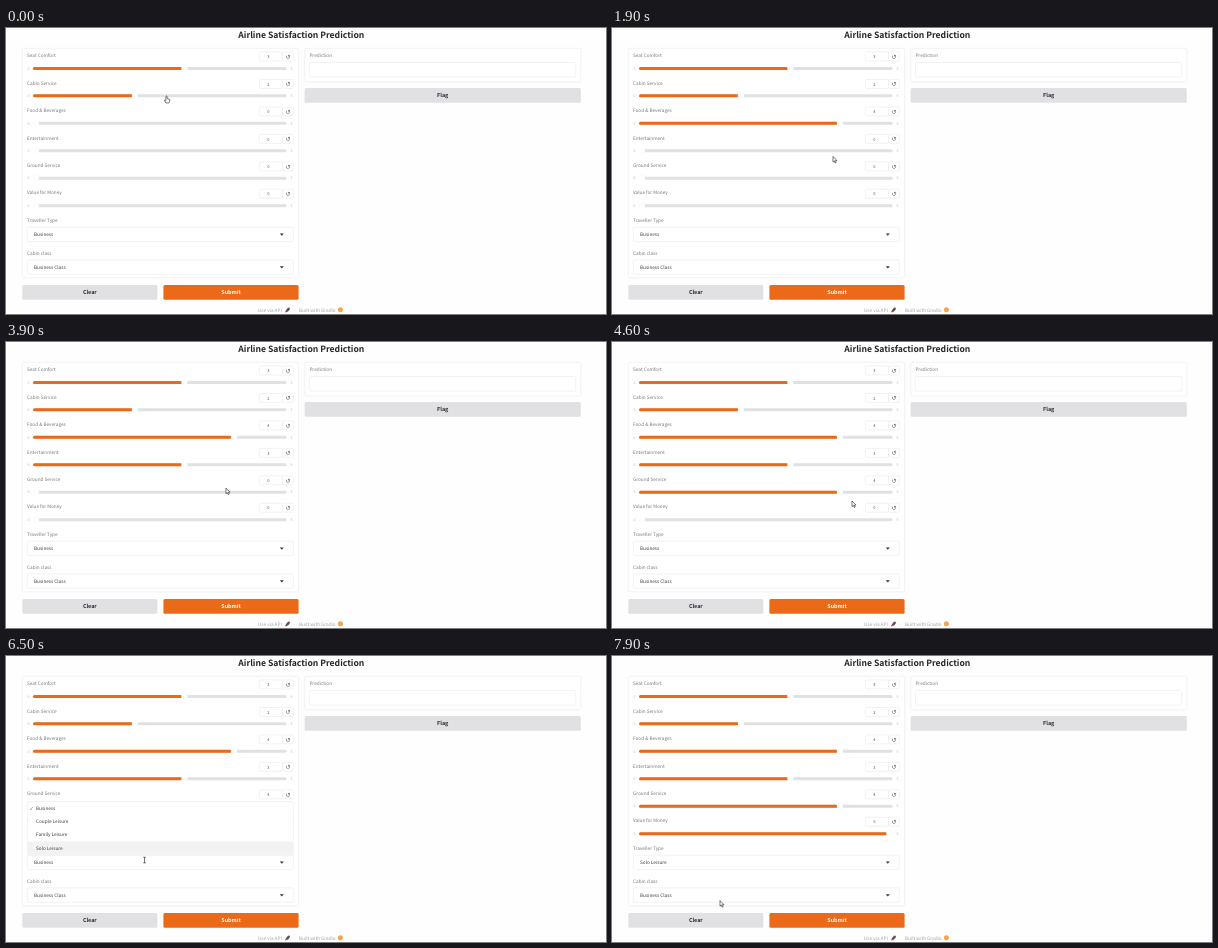
Write an HTML page that moves like this. It is 600 px wide and 286 px high and loops after 8 s.

```html
<!DOCTYPE html>
<html lang="en">
<head>
<meta charset="utf-8">
<title>Airline Satisfaction Prediction</title>
<style>
  html, body { margin: 0; width: 100%; height: 100%; overflow: hidden; background: #fefefe; }
  svg { display: block; width: 600px; height: 286px; }
  text {
    font: 4.7px "Noto Sans CJK JP", "Noto Sans CJK SC", "Noto Sans", sans-serif;
    fill: #77777c; text-rendering: geometricPrecision;
  }
  text.title { font-size: 8.6px; font-weight: 600; fill: #26262b; }
  text.button { font-size: 5.4px; font-weight: 600; fill: #2b2b30; }
  text.value { fill: #3c3c42; }
  text.number { font-size: 4px; fill: #55555a; }
  text.limit { font-size: 3.6px; fill: #b0b0b4; }
  text.foot { fill: #a2a2a8; }
  text.icon { font: 6px "DejaVu Sans", sans-serif; fill: #55555a; }
  .middle { text-anchor: middle; }
  .box { fill: #fff; stroke: #e9e9eb; stroke-width: .6; }
</style>
</head>
<body>
<svg id="stage" viewBox="0 0 600 286"></svg>
<script>
const LOOP = 8000;
const ORANGE = '#ea6a1a';
const stage = document.getElementById('stage');

function add(name, attrs, parent = stage) {
  const node = document.createElementNS('http://www.w3.org/2000/svg', name);
  for (const key in attrs) node.setAttribute(key, attrs[key]);
  return parent.appendChild(node);
}

function write(x, y, content, cls = '', parent = stage) {
  const node = add('text', { x, y, class: cls }, parent);
  node.textContent = content;
  return node;
}

function rect(x, y, width, height, attrs, parent = stage) {
  return add('rect', { x, y, width, height, rx: 1.5, ...attrs }, parent);
}

const box = (x, y, w, h) => rect(x, y, w, h, { class: 'box' });

function button(x, y, w, h, label, fill, ink) {
  rect(x, y, w, h, { fill });
  const node = write(x + w / 2, y + h / 2 + 2, label, 'button middle');
  if (ink) node.style.fill = ink;
}

function dropdown(y, label, value) {
  write(21, y - 5.2, label);
  box(21.3, y, 266, 14.4);
  add('path', { d: `M273.8 ${y + 6.4}h4l-2 2.2z`, fill: '#333' });
  return write(28, y + 9.2, value, 'value');
}

// Static layout
write(295.3, 10.3, 'Airline Satisfaction Prediction', 'title middle');
box(16.3, 20.3, 276.4, 229.6);
box(298.8, 20.3, 276, 33.6);
write(303.4, 29.1, 'Prediction');
box(303.4, 34.5, 266.4, 14.6);
button(298.6, 60, 276.2, 14.7, 'Flag', '#e1e1e3');
button(16.3, 257, 135, 14.7, 'Clear', '#e1e1e3');
button(157.4, 257, 135.2, 14.7, 'Submit', ORANGE, '#fff');

write(252, 283.6, 'Use via API', 'foot');
add('ellipse', { cx: 281.8, cy: 281.8, rx: 2.7, ry: 1.3, fill: '#6b4a48', transform: 'rotate(-45 281.8 281.8)' });
add('circle', { cx: 279.8, cy: 283.7, r: .8, fill: '#e2603c' });
write(288, 283.6, '·', 'foot middle');
write(293, 283.6, 'Built with Gradio', 'foot');
add('circle', { cx: 334.4, cy: 281.8, r: 2.5, fill: '#f6a44c' });

// Sliders: label, value before, value after, time of the click
const sliders = [
  ['Seat Comfort', 3], ['Cabin Service', 2],
  ['Food & Beverages', 0, 4, 800], ['Entertainment', 0, 3, 3400],
  ['Ground Service', 0, 4, 4100], ['Value for Money', 0, 5, 5200]
].map(([label, from, to = from, at = 0], i) => {
  const y = 40.4 + i * 27.45;
  write(21, y - 11.2, label);
  box(253.4, y - 16.4, 23.2, 9);
  box(276.6, y - 16.4, 10.8, 9);
  write(279.6, y - 9.7, '↺', 'icon');
  write(22.6, y + 1.2, '0', 'limit middle');
  write(285.6, y + 1.2, '5', 'limit middle');
  rect(27, y - 1.5, 253.6, 3, { fill: '#e1e1e3' });
  return {
    y, from, to, at,
    number: write(262.4, y - 10.2, '', 'number middle'),
    fill: rect(27, y - 1.5, 0, 3, { fill: ORANGE }),
    thumb: add('circle', { cy: y, r: 3, fill: '#fff', stroke: '#f0f0f0', 'stroke-width': .3 })
  };
});

const traveller = dropdown(199.2, 'Traveller Type', '');
dropdown(231.9, 'Cabin class', 'Business Class');

// Option list that opens upwards
const menu = add('g', {});
rect(21.3, 145.6, 266, 53.4, { class: 'box' }, menu);
const hover = rect(21.6, 0, 265.4, 13.2, { fill: '#f2f2f3' }, menu);
write(24, 154, '✓', 'value', menu).style.fontSize = '4px';
['Business', 'Couple Leisure', 'Family Leisure', 'Solo Leisure'].forEach(
  (option, i) => write(30, 154 + i * 13.2, option, 'value', menu));

// Pointer shapes, each with its hot spot at the origin
const outline = { fill: '#fff', stroke: '#222', 'stroke-width': .6, 'stroke-linejoin': 'round' };
const pointers = {
  arrow: add('path', { d: 'M0 0V5.6L1.3 4.4L2.2 6.5L3.2 6L2.3 4.1H4z', ...outline }),
  hand: add('path', { d: 'M-.6 .3Q0-.4 .6 .3V2.6L3.2 3.3V5.2L2.4 7H-.6L-2.3 4.3Q-2 3.4-.6 4.4z', ...outline }),
  beam: add('path', { d: 'M-1.2-2.8H1.2M0-2.8V2.8M-1.2 2.8H1.2', fill: 'none', stroke: '#333', 'stroke-width': .7 })
};

// Pointer path: time, x, y
const path = [
  [0, 160.5, 68], [200, 168, 75], [700, 225, 94.5], [1100, 225, 95], [1900, 221, 128.5],
  [2500, 197, 126], [3100, 177, 119.3], [3300, 177.5, 122], [3550, 177.5, 122],
  [4000, 226, 149.5], [4250, 226, 150], [4600, 240, 159], [5100, 275, 177],
  [5400, 275, 177], [6100, 143.5, 206], [6400, 143.5, 206], [6850, 105, 191],
  [7100, 104, 188.6], [7300, 104, 189], [7900, 108, 244.6], [8000, 108, 244.6]
];
const MENU_OPEN = 6280, MENU_CLOSE = 6980, FADE = 200;
const clamp = v => Math.max(0, Math.min(1, v));

function pointerAt(t) {
  const i = path.findIndex(key => key[0] > t);
  const [t0, x0, y0] = path[i - 1], [t1, x1, y1] = path[i];
  const p = (t - t0) / (t1 - t0), e = p * p * (3 - 2 * p);
  return [x0 + (x1 - x0) * e, y0 + (y1 - y0) * e];
}

function pointerKind(x, y, menuOpen) {
  if (menuOpen && y > 146 && y < 199) return 'hand';
  if (x > 27 && x < 281 && sliders.some(s => Math.abs(s.y - y) < 2.3)) return 'hand';
  if (x > 21 && x < 288 && (y > 199 && y < 213.5 || y > 232 && y < 244)) return 'beam';
  return 'arrow';
}

function draw(t) {
  for (const s of sliders) {
    const value = t < s.at ? s.from : s.to;
    const x = 30 + value * 49.5;
    s.number.textContent = value;
    s.fill.setAttribute('width', value ? x - 29.5 : 0);
    s.thumb.setAttribute('cx', x);
  }

  const [x, y] = pointerAt(t);
  const shown = Math.min(clamp((t - MENU_OPEN) / FADE), clamp(1 - (t - MENU_CLOSE) / FADE));
  menu.setAttribute('opacity', shown);
  menu.setAttribute('transform', `translate(0 ${(1 - shown) * 1.5})`);
  const row = Math.floor((y - 145.9) / 13.2);
  hover.setAttribute('y', 145.9 + Math.min(3, Math.max(0, row)) * 13.2);
  traveller.textContent = t < MENU_CLOSE ? 'Business' : 'Solo Leisure';

  const kind = pointerKind(x, y, t >= MENU_OPEN && t < MENU_CLOSE);
  for (const name in pointers) {
    pointers[name].setAttribute('visibility', name === kind ? 'visible' : 'hidden');
  }
  pointers[kind].setAttribute('transform', `translate(${x} ${y})`);
}

const start = performance.now();
function tick() {
  draw((performance.now() - start) % LOOP);
  requestAnimationFrame(tick);
}
tick();
</script>
</body>
</html>
```
